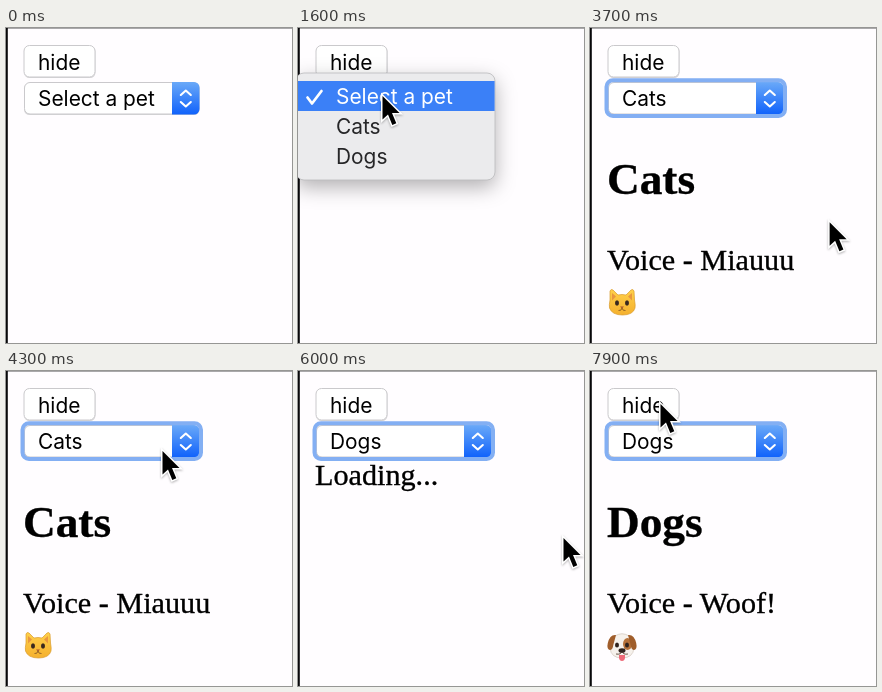
Animation, 286 px wide and 315 px high, one loop 8 s. Source, as an HTML page:

```html
<!DOCTYPE html>
<html lang="en">
<head>
<meta charset="utf-8">
<title>Pet select</title>
<style>
  html, body { margin: 0; width: 100%; height: 100%; overflow: hidden; background: #fffdff; }
  svg { display: block; width: 100vw; height: 100vh; }
  text { white-space: pre; }
  .ui { font: 20.9px Inter, sans-serif; }
  .serif { font: 30.2px "Liberation Serif", serif; }
  .serif text, text.serif { stroke: #000; stroke-width: .35; }
  .serif .title { font-size: 45.3px; font-weight: bold; }
  #popup text { fill: #262628; }
  #popup .on { fill: #fff; }
  .panel { filter: drop-shadow(0 7px 10px rgba(0, 0, 0, .3)); }
  #cursor path { filter: drop-shadow(0 1.5px 1px rgba(0, 0, 0, .3)); }
</style>
</head>
<body>
<svg viewBox="0 0 286 315">
  <defs>
    <linearGradient id="blue" x2="0" y2="1">
      <stop stop-color="#6aa9f8"/><stop offset="1" stop-color="#1062fb"/>
    </linearGradient>
    <linearGradient id="fur" x2="0" y2="1">
      <stop stop-color="#ffd04a"/><stop offset="1" stop-color="#f5b02e"/>
    </linearGradient>
  </defs>
  <rect width="286" height="315" fill="#fffdff"/>
  <rect width="286" height="1" fill="#aaa9ab"/>
  <rect width="1.8" height="315" fill="#08080a"/>

  <g class="ui">
    <rect x="18" y="18" width="71.5" height="32" rx="5.5" fill="#d8d7d9"/>
    <rect x="18" y="17.5" width="71" height="31.5" rx="5.5" fill="#fff" stroke="#cac9cc"/>
    <text x="32" y="41.5">hide</text>
    <rect x="18" y="55" width="175.5" height="32" rx="5.5" fill="#d8d7d9"/>
    <rect x="18.5" y="54.5" width="174.5" height="31.5" rx="5.5" fill="#fff" stroke="#cac9cc"/>
    <path d="M166 54h22a5.5 5.5 0 0 1 5.5 5.5v21.5a5.5 5.5 0 0 1-5.5 5.5h-22z" fill="url(#blue)"/>
    <path d="M174.800 67l5-4.500 5 4.500M174.800 74l5 4.500 5-4.500" fill="none" stroke="#fff" stroke-width="2.100" stroke-linecap="round" stroke-linejoin="round"/>
    <rect id="ring" x="16.500" y="52.300" width="178.500" height="35.700" rx="6.500" fill="none" stroke="#83aff3" stroke-width="4"/>
    <text id="choice" x="32" y="78"></text>
  </g>

  <text id="loading" class="serif" x="17" y="114">Loading...</text>
  <g id="details" class="serif">
    <text id="title" class="title" x="17" y="166.300"></text>
    <text id="voice" x="17" y="242"></text>
    <g id="cat" transform="translate(18 260)">
      <path d="M2 3Q3 .5 5 2l5 5q4-1 8 0l5-5q2-1.500 3 1l.5 9q1 5 .5 8-2 7-12.500 7T1.500 20q-.5-3 .5-8z" fill="url(#fur)" stroke="#d99a2b" stroke-width=".7"/>
      <path d="M4 5l4 3.500-4 4zM24 5l-4 3.500 4 4z" fill="#e8963f"/>
      <ellipse cx="9" cy="15" rx="2" ry="2.700" fill="#38281f"/>
      <ellipse cx="19" cy="15" rx="2" ry="2.700" fill="#38281f"/>
      <path d="M12 18.500h4l-2 2z" fill="#a8572c"/>
      <path d="M14 20q-.5 3-3.500 2.500M14 20q.5 3 3.500 2.500" fill="none" stroke="#8b5a24" stroke-width=".9"/>
    </g>
    <g id="dog" transform="translate(17 261)">
      <path d="M8 4Q15-.5 22 4q4 4 5 12-1 10-12 10T3 16Q4 8 8 4z" fill="#f6f1ec" stroke="#d0c5ba" stroke-width=".7"/>
      <ellipse cx="20.500" cy="12" rx="4.500" ry="6" fill="#b5713a"/>
      <path d="M9 3Q3 2 .8 11q-1.300 6 2 7 3 0 3.500-5zM21 3q6-1 8.200 8 1.300 6-2 7-3 0-3.500-5z" fill="#a05d2b"/>
      <ellipse cx="10" cy="13" rx="2" ry="2.500" fill="#30231d"/>
      <ellipse cx="20" cy="13" rx="2" ry="2.500" fill="#30231d"/>
      <path d="M12 23h6v3q-.5 3-3 3t-3-3z" fill="#ee6a78"/>
      <path d="M15 19q-1 4-6 3M15 19q1 4 6 3" fill="none" stroke="#5c4437" stroke-width=".9"/>
      <ellipse cx="15" cy="18.500" rx="3.500" ry="2.300" fill="#30231d"/>
    </g>
  </g>

  <g id="popup" class="ui">
    <rect class="panel" x="-2" width="199" height="107" rx="8" fill="#ebebed" stroke="#b9b9bc" stroke-width=".8"/>
    <rect id="bar" x="-2" width="198.600" height="30" fill="#3b80f7"/>
    <text x="38" y="31">Select a pet</text>
    <text x="38" y="61">Cats</text>
    <text x="38" y="91">Dogs</text>
    <path id="check" d="M9.500 24.500l4.500 6 9.500-12.500" fill="none" stroke-width="2.700" stroke-linecap="round" stroke-linejoin="round"/>
  </g>

  <g id="cursor">
    <path d="M1.500 3v23.500l5.500-5 4.300 10.500 4-1.700-4.300-10.300h7.500z" stroke="#fff" stroke-width="3" paint-order="stroke"/>
  </g>
</svg>
<script>
const LOOP = 8000, STEP = 100, ROW = 30;
const $ = id => document.getElementById(id);
const show = (id, on) => $(id).style.display = on ? '' : 'none';
const rows = document.querySelectorAll('#popup text');

// time, x, y of the pointer
const path = [
  [300, 111, 85], [500, 111, 85], [700, 171, 68], [1000, 69, 36], [1100, 69, 36],
  [1400, 83, 65], [1900, 83, 65], [2300, 70, 92], [2800, 70, 92], [3100, 243, 198],
  [3600, 243, 198], [4300, 155, 77], [4600, 155, 77], [5200, 148, 89], [5600, 148, 89],
  [6000, 264, 164], [6900, 264, 164], [7800, 64, 30], [7900, 69, 30]
];

const pages = [
  { at: 0, pet: 'Select a pet' },
  { at: 2900, pet: 'Cats', loading: true },
  { at: 3700, pet: 'Cats', voice: 'Miauuu' },
  { at: 5800, pet: 'Dogs', loading: true },
  { at: 6700, pet: 'Dogs', voice: 'Woof!' }
];

const menus = [
  { open: 1600, blink: 2500, y: 45, checked: 0 },
  { open: 4600, blink: 5400, y: 14.5, checked: 1 }
];

function pointerAt(t) {
  const i = path.findIndex(p => p[0] > t);
  if (i < 0) return path[path.length - 1].slice(1);
  const [t0, x0, y0] = path[Math.max(i - 1, 0)], [t1, x1, y1] = path[i];
  const k = Math.max(0, (t - t0) / (t1 - t0)), e = k * k * (3 - 2 * k);
  return [x0 + (x1 - x0) * e, y0 + (y1 - y0) * e];
}

function drawMenu(t, pointerY) {
  const menu = menus.find(m => t >= m.open && t < m.blink + 400);
  show('popup', menu);
  if (!menu) return;
  const since = t - menu.blink;
  const hover = Math.max(0, Math.min(2, Math.floor((pointerY - menu.y - 8) / ROW)));
  const active = since >= 0 && since < STEP ? -1 : hover;
  $('popup').setAttribute('transform', `translate(0 ${menu.y})`);
  $('popup').setAttribute('opacity', since < 200 ? 1 : since < 300 ? .45 : .12);
  show('bar', active >= 0);
  $('bar').setAttribute('y', 8 + Math.max(active, 0) * ROW);
  rows.forEach((row, i) => row.classList.toggle('on', i === active));
  $('check').setAttribute('transform', `translate(0 ${menu.checked * ROW})`);
  $('check').setAttribute('stroke', active === menu.checked ? '#fff' : '#262628');
}

function draw(t) {
  const page = pages.filter(p => p.at <= t).pop();
  $('choice').textContent = page.pet;
  show('ring', page.at > 0);
  show('loading', page.loading);
  show('details', page.voice);
  $('title').textContent = page.pet;
  $('voice').textContent = 'Voice - ' + page.voice;
  show('cat', page.pet === 'Cats');
  show('dog', page.pet === 'Dogs');

  const [x, y] = pointerAt(t);
  show('cursor', t >= path[0][0]);
  $('cursor').setAttribute('transform', `translate(${x} ${y})`);
  drawMenu(t, y);
}

const start = performance.now();
function tick() {
  const t = (performance.now() - start) % LOOP;
  draw(Math.floor(t / STEP) * STEP);
  requestAnimationFrame(tick);
}
tick();
</script>
</body>
</html>
```
